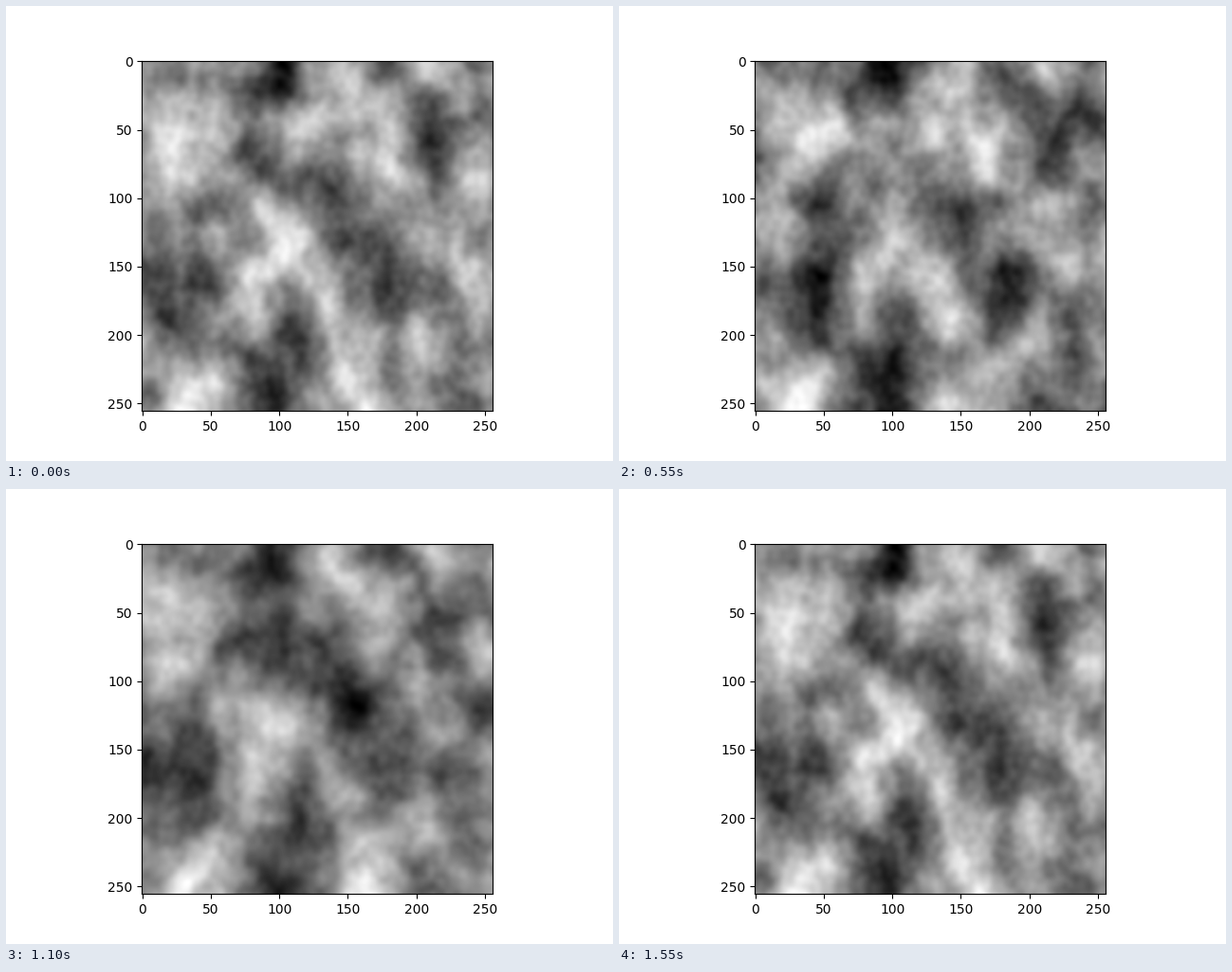
Write a matplotlib script that moves like this. It is 640 by 480 pixels and loops after 1.6 s.

```python
from itertools import product

import numpy as np
import matplotlib.pyplot as plt
from matplotlib.animation import FuncAnimation

SHAPE = (32, 256, 256)  # time, rows, columns
BASE_RES = (1, 4, 4)
OCTAVES = 4


def fade(t):
    return t * t * t * (t * (t * 6 - 15) + 10)


def random_gradients(res):
    size = [r + 1 for r in res]
    theta = 2 * np.pi * np.random.rand(*size)
    phi = 2 * np.pi * np.random.rand(*size)
    grads = np.stack((np.sin(phi) * np.cos(theta),
                      np.sin(phi) * np.sin(theta),
                      np.cos(phi)))
    grads[:, -1] = grads[:, 0]  # seamless in time
    return grads


def perlin(shape, res):
    grads = random_gradients(res)
    pos = [np.arange(n) * r / n for n, r in zip(shape, res)]
    cells = [p.astype(int) for p in pos]
    local = np.ix_(*[p % 1 for p in pos])

    noise = np.zeros(shape)
    for corner in product((0, 1), repeat=3):
        nodes = np.ix_(*[c + k for c, k in zip(cells, corner)])
        ramp = sum((x - k) * g[nodes] for x, k, g in zip(local, corner, grads))
        for x, k in zip(local, corner):
            ramp = ramp * (fade(x) if k else 1 - fade(x))
        noise += ramp
    return noise


def fractal(shape, res, octaves):
    return sum(0.5 ** o * perlin(shape, [r * 2 ** o for r in res])
               for o in range(octaves))


np.random.seed(0)
layers = fractal(SHAPE, BASE_RES, OCTAVES)

fig, ax = plt.subplots(figsize=(6.4, 4.8), dpi=100)
image = ax.imshow(layers[0], cmap="gray", interpolation="lanczos")


def update(i):
    image.set_data(layers[i])
    image.autoscale()  # each layer spans black to white
    return [image]


anim = FuncAnimation(fig, update, frames=len(layers), interval=50,
                     repeat=True, repeat_delay=0)
plt.show()
```
